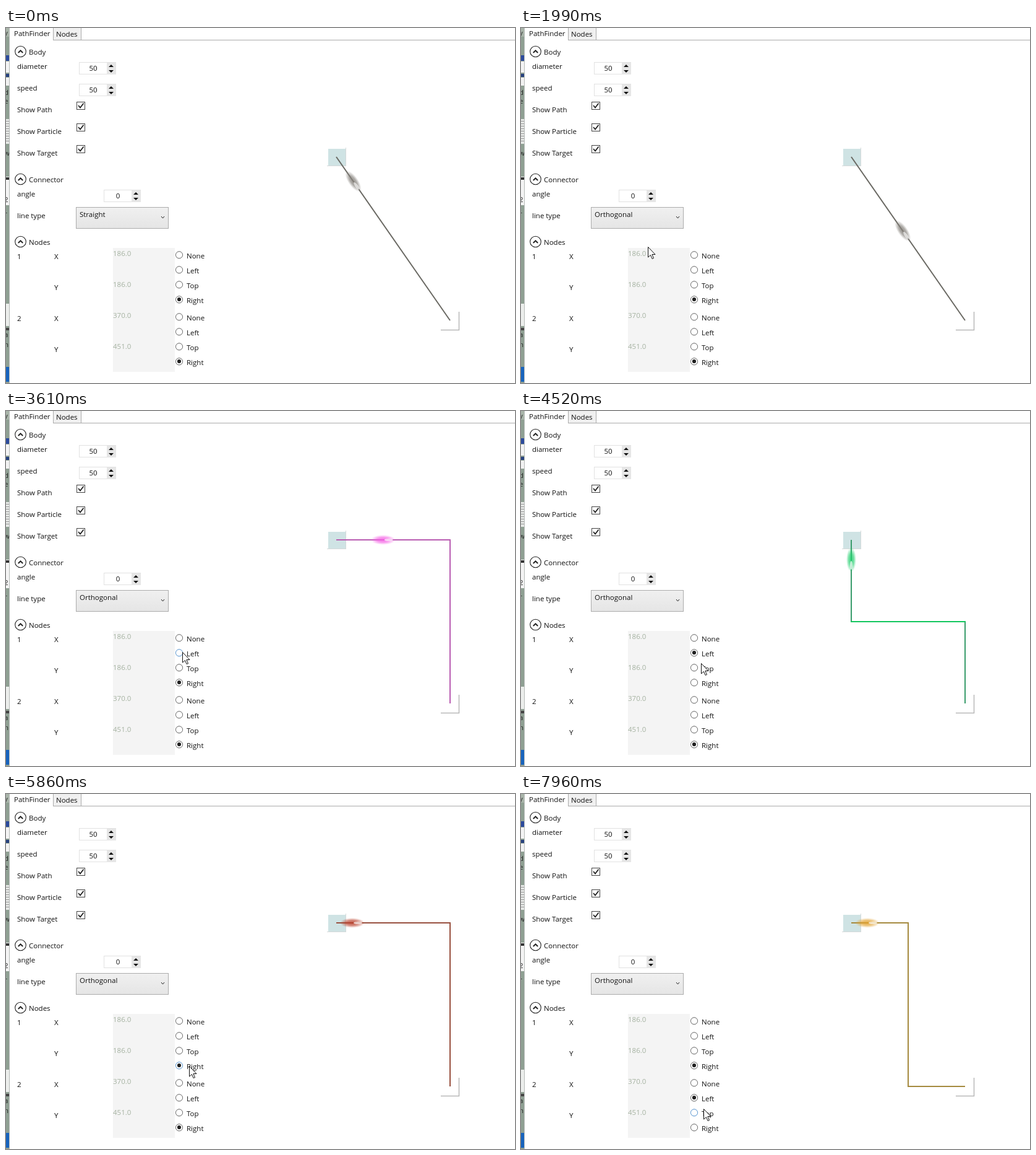
These frames come from a looping animation (823x573 px, 8 s). An HTML page:

```html
<!DOCTYPE html>
<html lang="en">
<head>
<meta charset="utf-8">
<title>PathFinder</title>
<style>
  html, body { margin: 0; width: 100%; height: 100%; overflow: hidden; background: #fff; }
  svg { display: block; }
  text { font: 11.5px "Open Sans", "Noto Sans", sans-serif; fill: #111; white-space: pre; }
  .value { fill: #a5b2a1; }
  .strip text { fill: #222; }
  .mark { fill: none; stroke: #222; }
</style>
</head>
<body>
<svg id="stage" width="823" height="573" viewBox="0 0 823 573">
  <defs>
    <linearGradient id="idle" x2="0" y2="1"><stop stop-color="#f0f0f0"/><stop offset="1" stop-color="#e5e5e5"/></linearGradient>
    <linearGradient id="active" x2="0" y2="1"><stop stop-color="#ecf4fc"/><stop offset="1" stop-color="#dcecfc"/></linearGradient>
    <radialGradient id="glow">
      <stop class="tint" stop-opacity=".85"/>
      <stop class="tint" offset=".5" stop-opacity=".65"/>
      <stop class="tint" offset="1" stop-opacity="0"/>
    </radialGradient>
    <clipPath id="stripClip"><rect width="5" height="573"/></clipPath>
    <clipPath id="popupClip"><rect x="110" y="324" width="160" height="70"/></clipPath>
  </defs>
  <g id="panel"></g>
  <g id="scene">
    <rect x="521" y="195" width="28" height="28" fill="#cfe3e4"/>
    <path d="M519 222.5H549M549.5 193V223" stroke="#d5d9d9" fill="none"/>
    <path d="M703 487.5H732.5V458" stroke="#b9b9b9" stroke-width="1.5" fill="none"/>
    <g id="route" fill="none" stroke-width="2"><path id="vertical"/><path id="horizontal"/></g>
    <g id="particle">
      <ellipse rx="20" ry="8" fill="url(#glow)"/>
      <ellipse cx="9" rx="7" ry="2" fill="#fff" opacity=".7"/>
    </g>
  </g>
  <g id="popup" clip-path="url(#popupClip)">
    <g id="list">
      <rect x="117" y="327" width="149" height="54" fill="#888" opacity=".7"/>
      <rect x="113.5" y="323.5" width="150" height="54" fill="#fff" stroke="#777"/>
      <rect id="choice" x="114" width="149" height="18" fill="#cfe6fb"/>
      <text x="119" y="336">Straight</text>
      <text x="119" y="354">Orthogonal</text>
      <text x="119" y="372">Curved</text>
    </g>
  </g>
  <path id="cursor" d="M0 0V16.5L4 13L6.6 19L9 18L6.4 12H11.5Z" fill="#fff" stroke="#111" stroke-linejoin="round"/>
</svg>
<script>
const $ = id => document.getElementById(id);
const NS = 'http://www.w3.org/2000/svg';
const LOOP = 8000;
const SPEED = 49;

function set(el, attrs) {
  for (const name in attrs) el.setAttribute(name, attrs[name]);
  return el;
}
function add(tag, attrs, parent = $('panel')) {
  return parent.appendChild(set(document.createElementNS(NS, tag), attrs));
}
function label(x, y, content, attrs = {}, parent) {
  const el = add('text', { x, y, ...attrs }, parent);
  el.textContent = content;
  return el;
}
function box(x, y, width, height, fill, stroke = 'none', parent) {
  return add('rect', { x, y, width, height, fill, stroke }, parent);
}

function buildStrip() {
  const strip = add('g', { class: 'strip', 'clip-path': 'url(#stripClip)' });
  const blocks = [
    [0, 573, '#8fa093'], [0, 14, '#a9b5aa'], [44, 9, '#2b4a9c'], [54, 18, '#f4f4f4'],
    [74, 5, '#26417e'], [80, 13, '#f2f2f2'], [147, 40, '#e6e8e6'], [240, 46, '#f4f4f4'],
    [241, 4, '#333'], [445, 36, '#eceeec'], [484, 4, '#444'], [547, 24, '#1763bd']
  ];
  for (const [y, height, fill] of blocks) box(0, y, 5, height, fill, 'none', strip);
  for (let y = 150; y < 186; y += 4) box(0, y, 5, 1, '#999', 'none', strip);
  for (const [y, letter] of [[12, 'y'], [108, 'd'], [122, 'e'], [206, 'w'], [281, '2'], [304, 'r'], [499, 'a'], [515, 'n']])
    label(-3, y, letter, {}, strip);
  box(5, 0, 1, 573, '#b4b8b6');
}

function expander(y, title) {
  add('circle', { cx: 23.5, cy: y, r: 8.8, class: 'mark', 'stroke-width': 1.1 });
  add('path', { d: `M19.8 ${y + 2}l3.7-3.7l3.7 3.7`, class: 'mark', 'stroke-width': 2 });
  label(37, y + 4.5, title);
}
function spinner(x, y, value) {
  box(x + .5, y + .5, 59, 19, '#fff', '#e2e2e2');
  box(x + 45, y + 1, 15, 19, '#e6e6e6');
  add('path', { d: `M${x + 48} ${y + 8}h8l-4-4zM${x + 48} ${y + 13}h8l-4 4z`, fill: '#111' });
  label(x + 23, y + 14, value, { 'text-anchor': 'middle' });
}
function checkbox(y) {
  box(114.5, y + .5, 13, 12, '#fff', '#444');
  add('path', { d: `M117 ${y + 6}l3 3.5l5.5-7`, class: 'mark', 'stroke-width': 1.8 });
}

buildStrip();
add('path', { d: 'M76 19.5H823', stroke: '#acacac' });
box(76.5, -.5, 45, 20, '#f0f0f0', '#acacac');
label(13, 13, 'PathFinder');
label(81, 14, 'Nodes');

expander(38, 'Body');
expander(244, 'Connector');
expander(345, 'Nodes');
[['diameter', 66], ['speed', 101], ['Show Path', 136], ['Show Particle', 171], ['Show Target', 206], ['angle', 272], ['line type', 307]]
  .forEach(([name, y]) => label(18, y, name));
spinner(118, 55, '50');
spinner(118, 90, '50');
spinner(158, 261, '0');
[119, 154, 189].forEach(checkbox);

const combo = box(113.5, 289.5, 149, 34, 'url(#idle)', '#acacac');
const comboText = label(119, 305, 'Straight');
const comboArrow = add('path', { d: 'M251 304l2.5 3l2.5-3', class: 'mark' });

box(173, 355, 100, 200, '#f4f4f4');
const radios = [];
[['186.0', '186.0'], ['370.0', '451.0']].forEach((values, node) => {
  const top = 373 + node * 100;
  label(18, top, node + 1);
  values.forEach((value, axis) => {
    label(78, top + axis * 50, 'XY'[axis]);
    label(173, top - 5 + axis * 50, value, { class: 'value' });
  });
  ['None', 'Left', 'Top', 'Right'].forEach((side, i) => {
    const y = top - 7 + i * 24;
    const ring = add('circle', { cx: 280, cy: y + .3, r: 5.6, fill: '#fff' });
    const dot = add('circle', { cx: 280, cy: y, r: 3.1, fill: '#212121' });
    label(292, y + 6, side);
    radios.push({ y, node, side, ring, dot });
  });
});

// The screen refreshes in blocks of twelve steps.
const blockStarts = [70, 880, 1710, 2550, 3400, 4240, 5080, 5930, 6770, 7610, 8450];
function snap(t) {
  const i = blockStarts.findLastIndex(start => start <= t);
  if (i < 0) return 0;
  const step = (blockStarts[i + 1] - blockStarts[i]) / 12;
  return blockStarts[i] + step * Math.floor((t - blockStarts[i]) / step + 1e-6);
}

const diagonal = 'M534 208L718 472';
const corner = { h: 'M534 208H719', v: 'M718 208V472' };
const routes = [
  { from: -980, v: diagonal, angle: 55.1, line: '#6b6a64', tint: '#85817b', sides: ['Right', 'Right'] },
  { from: 2065, ...corner, angle: 0, line: '#b95db2', tint: '#f45fe4', sides: ['Right', 'Right'] },
  { from: 3867, h: 'M533 340H719', v: 'M534 208V340M718 340V472', angle: 90, line: '#3a9c6c', bright: '#12c65e', tint: '#1fce6c', sides: ['Left', 'Right'] },
  { from: 5330, ...corner, angle: 0, line: '#98503f', tint: '#b93f2b', sides: ['Right', 'Right'] },
  { from: 6420, ...corner, angle: 0, line: '#5470a0', tint: '#4a7cd8', sides: ['Right', 'None'] },
  { from: 7430, h: 'M534 208H627M625 472H718', v: 'M626 208V472', angle: 0, line: '#a58a3f', tint: '#e0a02c', sides: ['Right', 'Left'] }
];

const pointer = [
  [140, 630, 535], [500, 420, 420], [820, 235, 318], [1230, 219, 312], [1500, 214, 338],
  [1780, 205, 353], [1990, 205, 353], [2200, 230, 368], [2550, 254, 378], [3330, 284, 388],
  [3880, 286, 390], [4520, 291, 407], [5010, 296, 436], [5860, 296, 439], [6300, 292, 466],
  [6500, 292, 467], [7200, 292, 490], [7480, 292, 491], [7960, 295, 508]
];
function pointerAt(t) {
  const i = pointer.findIndex(p => p[0] >= t);
  if (i < 1) return pointer[i < 0 ? pointer.length - 1 : 0].slice(1);
  const [a, b] = [pointer[i - 1], pointer[i]];
  const k = (t - a[0]) / (b[0] - a[0]);
  return [1, 2].map(n => Math.round(a[n] + (b[n] - a[n]) * k));
}

const tints = document.querySelectorAll('.tint');
function drawRoute(t) {
  const route = routes.findLast(r => r.from <= t);
  const distance = (t - route.from) / 1000 * SPEED;
  set($('vertical'), { d: route.v, stroke: route.line });
  set($('horizontal'), { d: route.h || '', stroke: route.bright || route.line });
  set($('particle'), { transform: `translate(534 208) rotate(${route.angle}) translate(${distance})` });
  tints.forEach(stop => set(stop, { 'stop-color': route.tint }));
  return route;
}

function drawCombo(t, y) {
  const open = t >= 1150 && t < 1850;
  const height = Math.min(54, 18 + Math.max(0, t - 1230) * .25);
  set(combo, { fill: open ? 'url(#active)' : 'url(#idle)', stroke: open ? '#7eb4ea' : '#acacac' });
  set(comboArrow, { 'stroke-width': open ? 1.8 : 1 });
  comboText.textContent = t < 1850 ? 'Straight' : 'Orthogonal';
  set($('popup'), { visibility: open ? 'visible' : 'hidden' });
  set($('list'), { transform: `translate(0 ${height - 54})` });
  set($('choice'), { y: 324 + 18 * Math.floor((y - 324) / 18), opacity: y > 324 ? 1 : 0 });
}

function draw(t) {
  const [x, y] = pointerAt(t);
  const route = drawRoute(t);
  drawCombo(t, y);
  for (const radio of radios) {
    const hover = x > 273 && x < 320 && t > 3000 && Math.abs(y - radio.y) <= 6;
    set(radio.ring, { stroke: hover ? '#5593cf' : '#666' });
    set(radio.dot, { opacity: route.sides[radio.node] === radio.side ? 1 : 0 });
  }
  set($('cursor'), { transform: `translate(${x + .5} ${y + .5})`, visibility: t < 140 ? 'hidden' : 'visible' });
}

const begin = performance.now();
function tick() {
  draw(snap((performance.now() - begin) % LOOP));
  requestAnimationFrame(tick);
}
tick();
</script>
</body>
</html>
```
